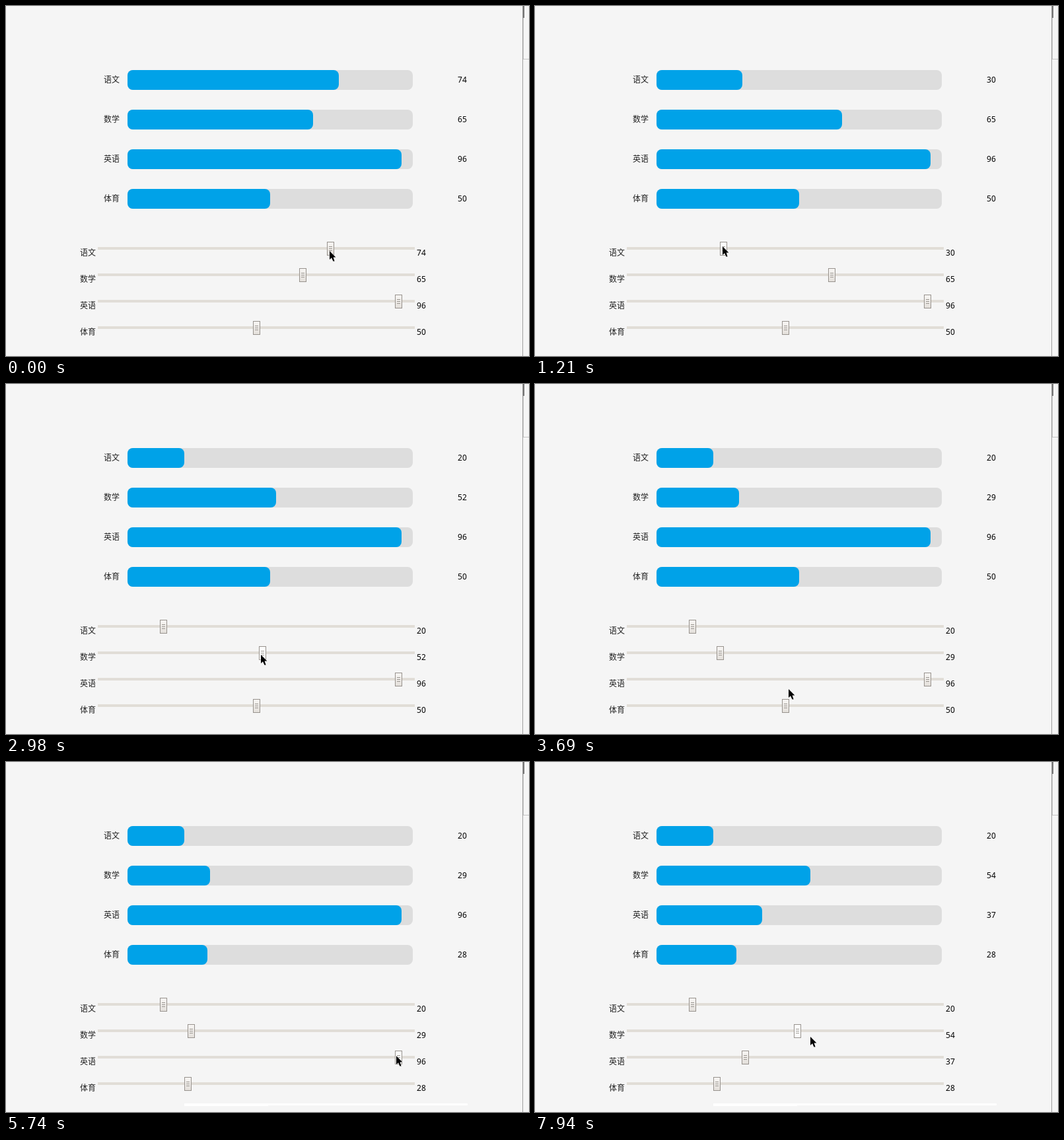
Recreate the animation shown at these times as an HTML page. Size 792 by 530 pixels, loop 8 s.

```html
<!DOCTYPE html>
<html lang="zh-CN">
<head>
<meta charset="utf-8">
<title>成绩滑块</title>
<style>
  html, body { margin: 0; width: 100%; height: 100%; overflow: hidden; background: #f5f5f5; }
  svg { display: block; }
  text { font: 12px "Noto Sans", "Noto Sans CJK SC", "Noto Sans CJK", sans-serif; fill: #222; }
  .num { letter-spacing: .14px; fill: #000; }
  .body { fill: url(#knob); stroke: #97928d; }
  .grip { stroke: #9b9792; }
  .hot .body { fill: #fdfdfc; }
</style>
</head>
<body>
<svg id="stage" width="792" height="530" viewBox="0 0 792 530">
  <defs>
    <linearGradient id="knob" x2="0" y2="1">
      <stop stop-color="#f8f6f4"/>
      <stop offset="1" stop-color="#e3dfda"/>
    </linearGradient>
  </defs>
  <g shape-rendering="crispEdges">
    <rect x="782" width="1" height="530" fill="#a0a0a0"/>
    <rect x="783" width="1" height="80" fill="#c8c8c8"/>
    <rect x="783" width="2" height="18" fill="#757575"/>
    <rect x="783" y="80" width="9" height="1" fill="#c4c4c4"/>
  </g>
  <g id="rows"></g>
  <path id="streak" d="M270 517H699V520H397V521H270Z" fill="#fff"/>
  <path id="cursor" d="M0 0V13L3 10.3L5.4 15.6H7.6L5.6 9.6H9.4Z" stroke="#fff" paint-order="stroke"/>
</svg>
<script>
const LOOP = 8000, REFRESHES = 60, LAST = 7940;
const $ = id => document.getElementById(id);

const subjects = [
  { name: '语文', score: 74 },
  { name: '数学', score: 65 },
  { name: '英语', score: 96 },
  { name: '体育', score: 50 }
];

// Pointer gestures; those with a row drag its slider to the given score
const home = { x: 490, y: 371 };
const moves = [
  { from: 10, to: 1456, x: 238, y: 363, row: 0, score: 20 },
  { from: 1700, to: 2380, x: 444, y: 410 },
  { from: 2720, to: 3260, x: 281, y: 410, row: 1, score: 29 },
  { from: 3260, to: 3570, x: 384, y: 462 },
  { from: 3700, to: 4090, x: 379, y: 490 },
  { from: 4090, to: 4630, x: 275, y: 491, row: 3, score: 28 },
  { from: 4900, to: 5400, x: 591, y: 445 },
  { from: 5690, to: 6480, x: 320, y: 453, row: 2, score: 37 },
  { from: 6750, to: 7240, x: 282, y: 411 },
  { from: 7380, to: 7800, x: 322, y: 415, row: 1, score: 37 },
  { from: 7800, to: LAST, x: 417, y: 416, row: 1, score: 54 }
];

const mix = (a, b, p) => a + (b - a) * p;
const ease = p => p * p * (3 - 2 * p);

function stateAt(t) {
  let { x, y } = home, hot;
  const scores = subjects.map(s => s.score);
  for (const m of moves) {
    if (t < m.from) break;
    const p = Math.min(1, (t - m.from) / (m.to - m.from));
    const dragging = m.row !== undefined;
    const q = dragging ? p : ease(p);
    x = mix(x, m.x, q);
    y = mix(y, m.y, q);
    if (dragging) scores[m.row] = mix(scores[m.row], m.score, p);
    hot = m.row;
  }
  return { x, y, hot, scores: scores.map(Math.round) };
}

function add(tag, attrs, parent = $('rows'), label = '') {
  const el = document.createElementNS($('stage').namespaceURI, tag);
  for (const k in attrs) el.setAttribute(k, attrs[k]);
  el.textContent = label;
  return parent.appendChild(el);
}

const rows = subjects.map(({ name }, i) => {
  const y = 97 + 60 * i, top = 357 + 40 * i;
  const bar = { x: 184, y, width: 432, height: 30, rx: 8 };
  const number = (x, y) => add('text', { x, y, class: 'num' });

  add('text', { x: 148, y: y + 19 }, undefined, name);
  add('rect', { ...bar, fill: '#ddd' });
  const fill = add('rect', { ...bar, fill: '#00a2e8' });

  add('text', { x: 112, y: top + 21 }, undefined, name);
  add('rect', { x: 139, y: top + 8, width: 480, height: 4, fill: '#e1ddd7' });
  const nums = [number(684, y + 19), number(622, top + 21)];

  const thumb = add('g', {});
  add('rect', { x: .5, y: .5, width: 10, height: 20, class: 'body' }, thumb);
  add('path', { d: 'M3 7.5h5M3 10.5h5M3 13.5h5', class: 'grip' }, thumb);
  return { fill, nums, thumb, top };
});

function place(el, x, y) {
  el.setAttribute('transform', `translate(${Math.round(x)} ${Math.round(y)})`);
}

function draw(t) {
  const { x, y, hot, scores } = stateAt(t);
  rows.forEach(({ fill, nums, thumb, top }, i) => {
    const score = scores[i];
    fill.setAttribute('width', Math.round(score * 4.32));
    nums.forEach(n => n.textContent = score);
    place(thumb, 139 + score * 4.69, top);
    thumb.setAttribute('class', i === hot ? 'hot' : '');
  });
  place($('cursor'), x, y);
  $('streak').style.opacity = +(t >= 4500);
}

// The screen refreshes in even steps, the last one at LAST
function frame() {
  const t = performance.now() % LOOP;
  draw(Math.floor(t * REFRESHES / LAST) * LAST / REFRESHES);
  requestAnimationFrame(frame);
}
frame();
</script>
</body>
</html>
```
